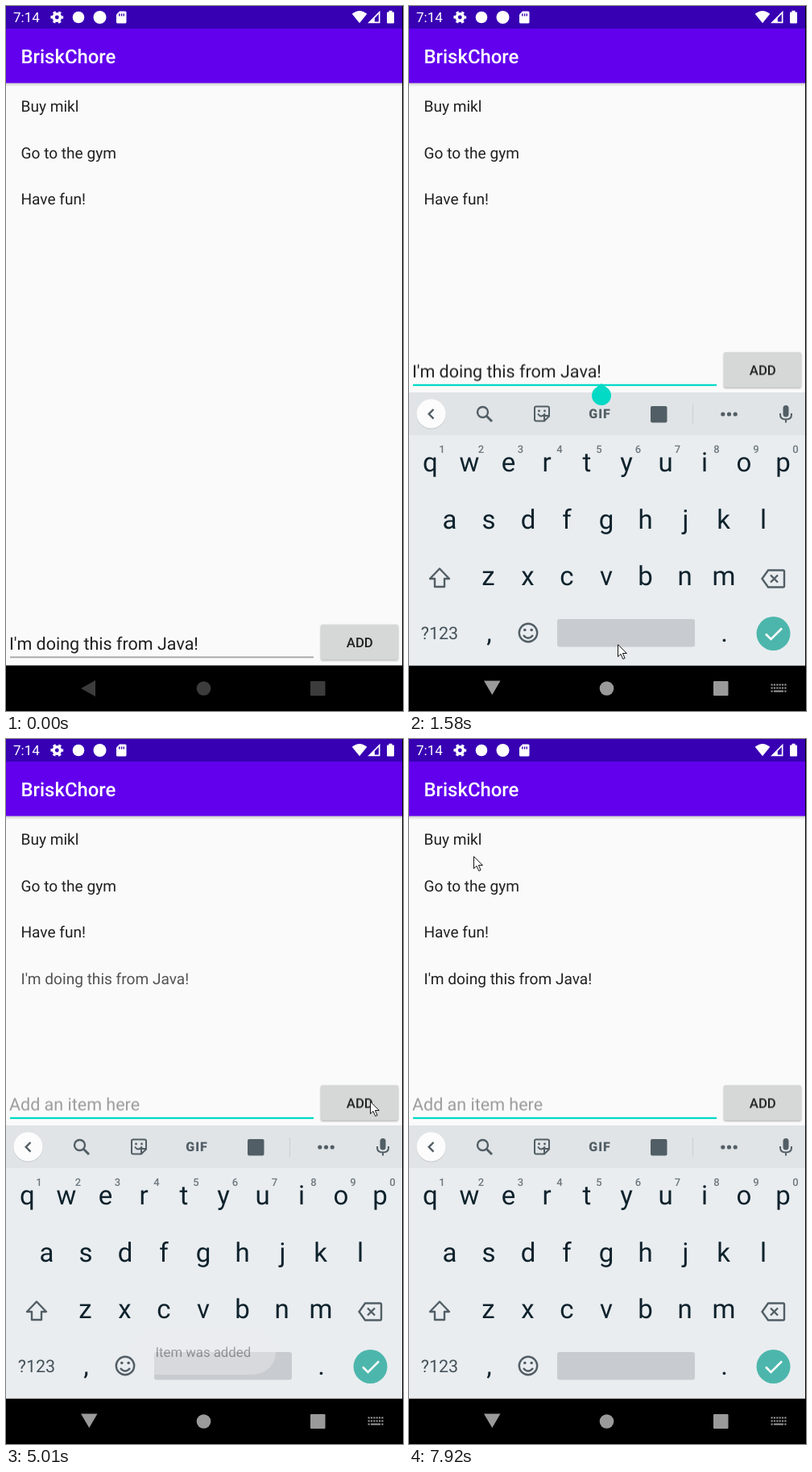
Write an HTML page that moves like this. It is 493 by 874 pixels and loops after 8000 ms.

```html
<!DOCTYPE html>
<html lang="en">
<head>
<meta charset="utf-8">
<title>Todo list</title>
<style>
html, body { margin: 0; width: 100%; height: 100%; overflow: hidden; background: #000; }
svg { display: block; width: 493px; height: 874px; font-family: Roboto, "Noto Sans", sans-serif; text-rendering: geometricPrecision; }
.item { font-size: 19.1px; fill: #212121; }
.entry { font-size: 21.5px; }
.line { fill: none; stroke: #525e65; stroke-width: 2.4; }
.mid { text-anchor: middle; }
.keys { font-size: 33px; fill: #0e222c; text-anchor: middle; }
.hints { font-size: 13px; font-weight: 500; fill: #6d777d; text-anchor: middle; }

.anim { animation: 8s step-end infinite; }
#pointer { animation-name: pointer; }
#form { animation-name: form; }
#keyboard { animation-name: keyboard; }
#idle { animation-name: idle; }
#focus, #navOn { animation-name: focus; }
#navOff { animation-name: unfocus; }
#typed { animation-name: typed; }
#hint { animation-name: hint; }
#handle { animation-name: handle; }
#caretEnd { animation-name: caretEnd; }
#caretStart { animation-name: caretStart; }
#button { animation-name: button; }
#added { animation-name: added; }
#toast { animation-name: toast; }

@keyframes pointer {
  0% { opacity: 0; transform: translate(332px, 777px); }
  7.375% { opacity: 1; transform: translate(332px, 777px); }
  9.25% { opacity: 1; transform: translate(224px, 767px); }
  11.125% { opacity: 1; transform: translate(254px, 790px); }
  13% { opacity: 1; transform: translate(259px, 791px); }
  21.625% { opacity: 1; transform: translate(300px, 730px); }
  23.125% { opacity: 1; transform: translate(420px, 560px); }
  24.625% { opacity: 1; transform: translate(473px, 462px); }
  26.5% { opacity: 1; transform: translate(464px, 457px); }
  28% { opacity: 1; transform: translate(456px, 452px); }
  29.875% { opacity: 1; transform: translate(452px, 449px); }
  66% { opacity: 1; transform: translate(430px, 450px); }
  67.5% { opacity: 1; transform: translate(365px, 451px); }
  69% { opacity: 1; transform: translate(343px, 452px); }
  90.375% { opacity: 1; transform: translate(341px, 442px); }
  92.25% { opacity: 1; transform: translate(270px, 330px); }
  93.75% { opacity: 1; transform: translate(184px, 222px); }
  95.625% { opacity: 1; transform: translate(172px, 220px); }
  97.125% { opacity: 1; transform: translate(164px, 219px); }
  99%, 100% { opacity: 1; transform: translate(80px, 145px); }
}
@keyframes form {
  0% { transform: translateY(337.6px); }
  16.375%, 100% { transform: none; }
}
@keyframes keyboard {
  0% { opacity: 0; transform: translateY(51px); }
  16.375% { opacity: .4; transform: translateY(38px); }
  17.875% { opacity: .8; transform: translateY(17.5px); }
  19.75%, 100% { opacity: 1; transform: none; }
}
@keyframes focus { 0% { opacity: 0; } 14.875%, 100% { opacity: 1; } }
@keyframes unfocus { 0% { opacity: 1; } 14.875%, 100% { opacity: 0; } }
@keyframes idle { 0% { opacity: 1; } 14.875%, 100% { opacity: 0; } }
@keyframes typed { 0% { opacity: 1; } 60.75%, 100% { opacity: 0; } }
@keyframes hint { 0% { opacity: 0; } 60.75%, 100% { opacity: 1; } }
@keyframes handle { 0%, 60.75%, 100% { opacity: 0; } 16.375% { opacity: 1; } }
@keyframes caretEnd {
  0%, 19.75%, 33.25%, 45.625%, 60.75%, 100% { opacity: 0; }
  14.875%, 26.5%, 38.625%, 51.875% { opacity: 1; }
}
@keyframes caretStart {
  0%, 62.625%, 75.5%, 87.375%, 99%, 100% { opacity: 0; }
  60.75%, 69%, 82.5%, 93.75% { opacity: 1; }
}
@keyframes button {
  0%, 62.625%, 100% { fill: #d6d7d7; filter: drop-shadow(0 1.5px 1px #0005); }
  57.25% { fill: #c9caca; filter: drop-shadow(0 2.5px 2.5px #0007); }
}
@keyframes added {
  0% { opacity: 0; }
  62.625% { opacity: .77; }
  64.125%, 100% { opacity: 1; }
}
@keyframes toast {
  0%, 87.375%, 100% { opacity: 0; }
  62.625% { opacity: .42; }
  64.125% { opacity: .9; }
  66% { opacity: 1; }
  84% { opacity: .85; }
  85.875% { opacity: .52; }
}
</style>
</head>
<body>
<svg viewBox="0 0 493 874" xmlns="http://www.w3.org/2000/svg">
  <defs>
    <linearGradient id="shade" x2="0" y2="1">
      <stop stop-color="#000" stop-opacity=".2"/>
      <stop offset="1" stop-color="#000" stop-opacity="0"/>
    </linearGradient>
  </defs>
  <rect width="493" height="874" fill="#fafafa"/>
  <rect y="95" width="493" height="5" fill="url(#shade)"/>
  <rect y="28" width="493" height="67.5" fill="#6200ee"/>
  <rect width="493" height="28" fill="#3700b3"/>

  <!-- status bar -->
  <g fill="#fff">
    <text x="9" y="20.3" font-size="17">7:14</text>
    <g fill="none" stroke="#fff">
      <circle cx="63.3" cy="14" r="4.2" stroke-width="3.6"/>
      <circle cx="63.3" cy="14" r="6.6" stroke-width="2.6" stroke-dasharray="3.4 3.51" stroke-dashoffset="1.7"/>
    </g>
    <circle cx="90" cy="14" r="7.3"/>
    <circle cx="116.5" cy="14" r="8"/>
    <path d="M141 6.5h7q1.5 0 1.5 1.5v12q0 1.5-1.5 1.5h-9.500q-1.500 0-1.500-1.500v-9.500z"/>
    <path d="M140.800 9.500v3m2.800-3v3m2.700-3v3" stroke="#3700b3" stroke-width="1.400"/>
    <path d="M429.700 9.800q9.300-7.600 18.600 0l-9.300 11.400z"/>
    <path d="M464.500 5.800v15.400h-15.400zM462.800 10l-5 5v4.500h5z" fill-rule="evenodd"/>
    <path d="M475.500 7.500v-1.700h4v1.700h1.500q1 0 1 1v12q0 1-1 1h-7q-1 0-1-1v-12q0-1 1-1z"/>
    <text x="18.500" y="71.300" font-size="23.900" font-weight="500">BriskChore</text>
  </g>

  <g class="item">
    <text x="18.500" y="131.300">Buy mikl</text>
    <text x="18.500" y="188.700">Go to the gym</text>
    <text x="18.500" y="246.200">Have fun!</text>
    <text x="18.500" y="303.600" id="added" class="anim">I'm doing this from Java!</text>
  </g>

  <!-- navigation bar -->
  <rect y="817.500" width="493" height="56.500" fill="#000"/>
  <g id="navOff" class="anim" fill="#3c3c3c">
    <path d="M93 846l18-10v20z"/>
    <circle cx="245.500" cy="846" r="8.800"/>
    <rect x="378" y="837" width="18.500" height="18" rx="1"/>
  </g>
  <g id="navOn" class="anim" fill="#9a9a9a">
    <path d="M93 836.500h20.500l-10.200 17.500z"/>
    <circle cx="245.500" cy="846" r="8.800"/>
    <rect x="378" y="837" width="18.500" height="18" rx="1"/>
    <path d="M449.500 841.500h19M449.500 845.500h19" fill="none" stroke="#9a9a9a" stroke-width="2" stroke-dasharray="2.200 1.160"/>
    <path d="M449.500 849.500h2.200m1.200 0h12.200m1.200 0h2.200" fill="none" stroke="#9a9a9a" stroke-width="2"/>
  </g>

  <g id="keyboard" class="anim">
    <rect y="479" width="493" height="338.500" fill="#e9edf0"/>
    <rect y="479" width="493" height="53" fill="#e0e4e7"/>
    <circle cx="27.500" cy="506.500" r="18" fill="#0002"/>
    <circle cx="27.500" cy="505.500" r="18" fill="#fcfcfc"/>
    <path class="line" d="M30.500 500l-5.800 5.800 5.800 5.800"/>
    <g class="line">
      <circle cx="91.500" cy="503.500" r="6.500"/>
      <path d="M96 508l7 7" stroke-width="3"/>
      <path d="M158 496.500h14q2 0 2 2v10l-6 6h-10q-2 0-2-2v-14q0-2 2-2zM174 508h-6v6.500M160 505.500q4 6 9 0" stroke-width="2"/>
      <path d="M352.500 494v24" stroke="#cbd0d4" stroke-width="1"/>
      <path d="M461 505v1.500q0 6 7 6t7-6v-1.500M468 512v4.500" stroke-width="2"/>
    </g>
    <g fill="#525e65">
      <circle cx="161.500" cy="502" r="1.400"/><circle cx="168.500" cy="502" r="1.400"/>
      <text class="mid" x="237" y="511.200" font-size="16" font-weight="900" letter-spacing="1">GIF</text>
      <rect x="300" y="496" width="20.500" height="20.500" rx="2"/>
      <circle cx="389.800" cy="506" r="2.600"/><circle cx="397.500" cy="506" r="2.600"/><circle cx="405.200" cy="506" r="2.600"/>
      <rect x="464.500" y="495" width="7" height="14.500" rx="3.500"/>
    </g>
    <g class="keys">
      <text y="577" x="26.500 75 123.500 171 221 270 318.500 367 416 464.500">qwertyuiop</text>
      <text y="647.500" x="50.500 99 148 196 245 293.500 343.500 390.500 440">asdfghjkl</text>
      <text y="718" x="98.500 147.500 196 245 293.500 342.500 391">zxcvbnm</text>
      <text y="787.500" x="99.500 391.500">,.</text>
    </g>
    <text class="hints" y="553.500" x="41 89.500 138.500 187 236 284.500 333.500 382 431 480">1234567890</text>
    <text class="mid" x="38" y="784.800" font-size="21.500" fill="#455259">?123</text>
    <g class="line">
      <path d="M38 697.500l12 12.500h-6v10h-12v-10h-6z" stroke-linejoin="round"/>
      <path d="M446 699.500h18.500q1.500 0 1.500 1.500v18q0 1.500-1.500 1.500H446l-7.500-10.500zM449 705.500l9 9m0-9l-9 9"/>
      <circle cx="148" cy="777" r="11.200"/>
      <path d="M142 780q6 7 12 0"/>
    </g>
    <g fill="#525e65"><circle cx="143.800" cy="773.500" r="1.800"/><circle cx="152.200" cy="773.500" r="1.800"/></g>
    <rect x="184" y="760" width="171" height="34.500" rx="3" fill="#c8ccd0"/>
    <circle cx="452.500" cy="778" r="21" fill="#4db6ac"/>
    <path d="M443 778.500l6.500 6.500 13.500-13.500" fill="none" stroke="#fff" stroke-width="2.500"/>
  </g>

  <!-- entry field and button -->
  <g id="form" class="anim">
    <rect id="idle" class="anim" x="5" y="469" width="377" height="1.300" fill="#858585"/>
    <rect id="focus" class="anim" x="5" y="468.800" width="377" height="2.300" fill="#03dac5"/>
    <text id="typed" class="anim entry" x="4" y="460.500" fill="#212121">I'm doing this from Java!</text>
    <text id="hint" class="anim entry" x="4" y="460.500" fill="#9b9b9b">Add an item here</text>
    <rect id="caretEnd" class="anim" x="238.500" y="437" width="2.400" height="30" fill="#03dac5"/>
    <rect id="caretStart" class="anim" x="4" y="437" width="2.400" height="30" fill="#03dac5"/>
    <path id="handle" class="anim" d="M239 468l8.500 6.500a12 12 0 1 1-17 0z" fill="#03dac5"/>
    <rect id="button" class="anim" x="391" y="429.300" width="96" height="43.500" rx="2"/>
    <text class="mid" x="439.300" y="457.300" font-size="16.750" font-weight="500" fill="#212121">ADD</text>
  </g>

  <g id="toast" class="anim">
    <rect x="157" y="732" width="178" height="56" rx="28" fill="#ebedef"/>
    <text x="185.500" y="766" font-size="16.750" fill="#333">Item was added</text>
  </g>

  <path id="pointer" class="anim" d="M.5.700v15l3.500-3.300 2.700 6.100 2.400-1-2.700-6h4.900z" fill="#fff" stroke="#111"/>
  <rect x="492" width="1" height="874" fill="#000"/>
</svg>
</body>
</html>
```
